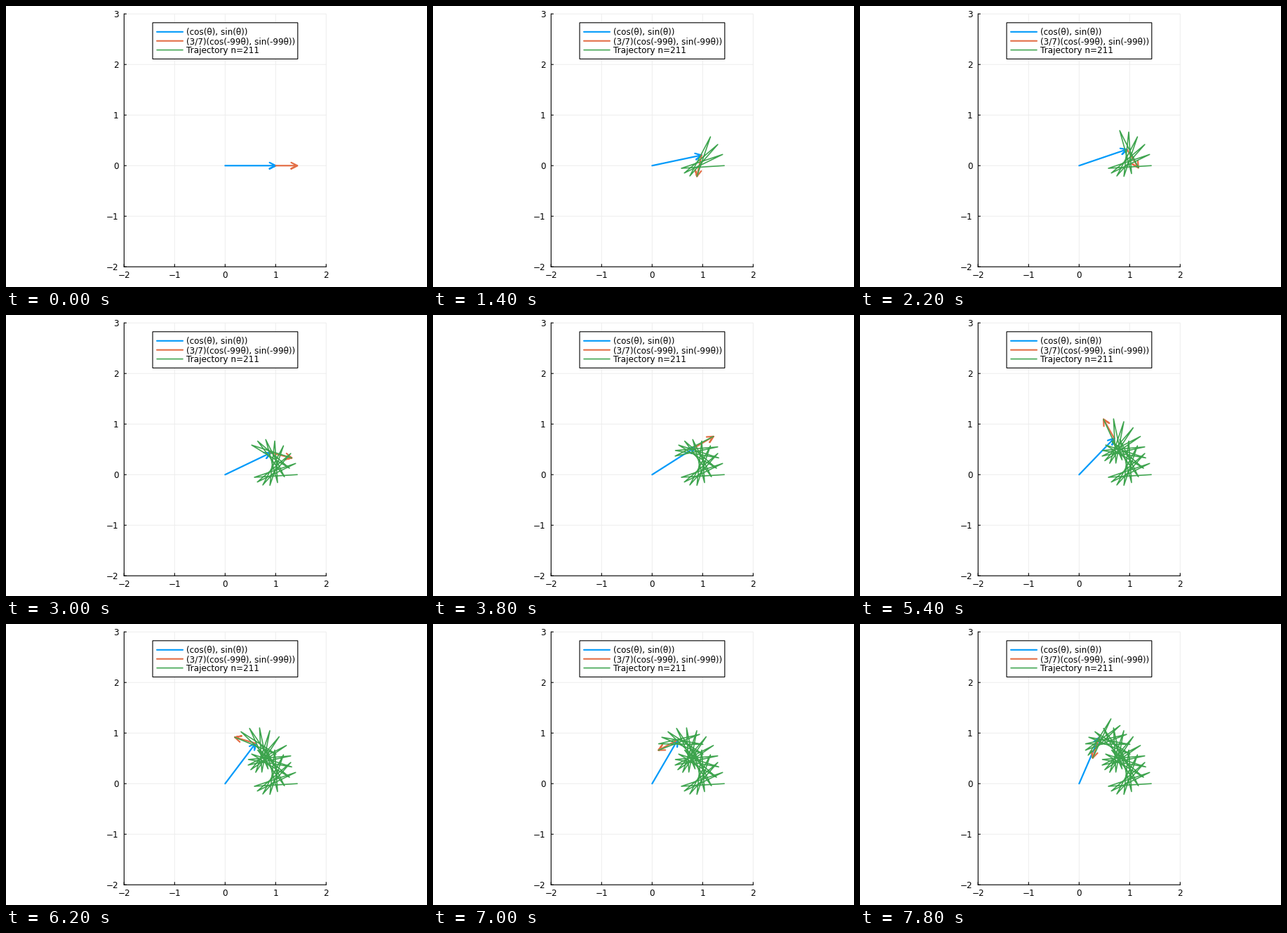
A matplotlib script that plays this animation: 600x400 px, repeating every 8 s.

```python
import numpy as np
import matplotlib.pyplot as plt
from matplotlib.animation import FuncAnimation
from matplotlib.patches import Rectangle

W, H, DPI = 600, 400, 100
PT = 72 / DPI
UNIT = 72
X0, Y0 = 312.3, 227.25
N, SPIN, RATIO = 211, -99, 3 / 7
FRAMES, STEP = 40, 200
BLUE, ORANGE, GREEN = "#009afa", "#e36f47", "#3ea44e"
GRID = "#ededed"

plt.rcParams["font.family"] = "DejaVu Sans"
plt.rcParams["path.simplify"] = False
plt.rcParams["path.snap"] = False
fig = plt.figure(figsize=(W / DPI, H / DPI), dpi=DPI, facecolor="white")
ax = fig.add_axes([0, 0, 1, 1])
ax.set_xlim(0, W)
ax.set_ylim(H, 0)
ax.axis("off")


def px(x):
    return X0 + UNIT * np.asarray(x)


def py(y):
    return Y0 - UNIT * np.asarray(y)


def line(xs, ys, color, width, z, cap="butt"):
    return ax.plot(xs, ys, color=color, lw=width * PT, zorder=z,
                   solid_joinstyle="round", solid_capstyle=cap)[0]


def label(x, y, text, ha):
    ax.text(x, y, text, fontsize=12 * PT, ha=ha, va="baseline", zorder=12)


def tick_name(v):
    return str(v).replace("-", "\u2212")


left, right, top, bottom = px(-2), px(2), py(3), py(-2)

# Grid, ticks and axes
for v in range(-2, 3):
    line([px(v)] * 2, [top, bottom], GRID, 1, 1)
    line([px(v)] * 2, [bottom, bottom - 4], "black", 1.1, 3)
    label(px(v), 387.2, tick_name(v), "center")
for v in range(-2, 4):
    line([left, right], [py(v)] * 2, GRID, 1, 1)
    line([left, left + 3.5], [py(v)] * 2, "black", 1.1, 3)
    label(160.7, py(v) + 4.9, tick_name(v), "right")
line([left, left], [top, bottom], "black", 1.1, 3, "projecting")
line([left, right], [bottom, bottom], "black", 1.1, 3, "projecting")

# Legend
ax.add_patch(Rectangle((209, 23.8), 206.8, 51.6, fc="white", ec="black",
                       lw=1.1 * PT, zorder=10))
rows = [("(cos(θ), sin(θ))", BLUE, 2.1),
        ("(3/7)(cos(-99θ), sin(-99θ))", ORANGE, 2.1),
        ("Trajectory n=211", GREEN, 1.6)]
for i, (text, color, width) in enumerate(rows):
    y = 36.8 + 12.9 * i
    line([215, 252], [y, y], color, width, 11, "round")
    label(257, y + 4.4, text, "left")

# Moving parts
blue = line([], [], BLUE, 2.2, 5, "round")
orange = line([], [], ORANGE, 2.2, 6, "round")
trail = line([], [], GREEN, 1.6, 7, "round")


def set_arrow(artist, start, end):
    """Shaft and open head drawn as one stroke."""
    u = (end - start) / np.hypot(*(end - start))
    n = np.array([-u[1], u[0]])
    back = end - 8.7 * u
    pts = np.array([start, end, back + 4.4 * n, end, back - 4.4 * n])
    artist.set_data(pts[:, 0], pts[:, 1])


def draw(k):
    t = 2 * np.pi * np.arange(k + 1) / N
    cx, cy = np.cos(t), np.sin(t)
    tx = px(cx + RATIO * np.cos(SPIN * t))
    ty = py(cy + RATIO * np.sin(SPIN * t))
    hub = np.array([px(cx[-1]), py(cy[-1])])
    set_arrow(blue, np.array([X0, Y0]), hub)
    set_arrow(orange, hub, np.array([tx[-1], ty[-1]]))
    # A lone starting point leaves no mark
    trail.set_data(tx, ty)
    trail.set_visible(k > 0)
    return blue, orange, trail


anim = FuncAnimation(fig, draw, frames=FRAMES, interval=STEP, repeat=True,
                     repeat_delay=0)
plt.show()
```
